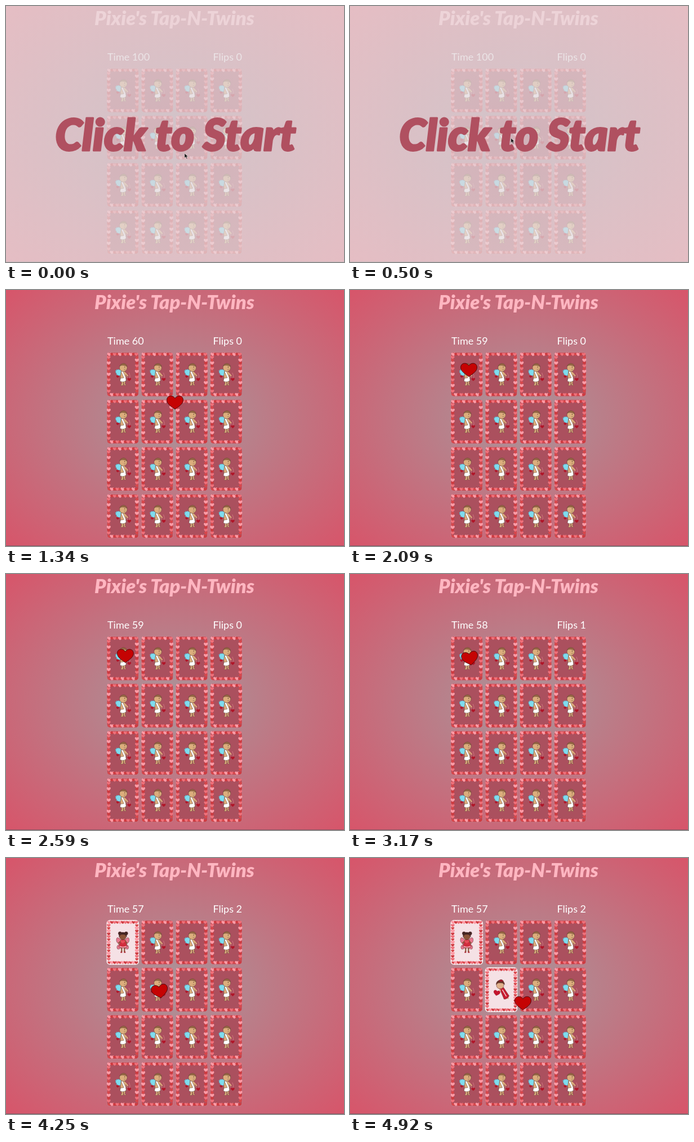
Write an HTML page that moves like this. It is 600 px wide and 455 px high and loops after 5000 ms.

```html
<!DOCTYPE html>
<html lang="en">
<head>
<meta charset="utf-8">
<title>Pixie's Tap-N-Twins</title>
<style>
html, body { margin: 0; width: 100%; height: 100%; overflow: hidden; background: #d5586a; }
svg { display: block; width: 600px; height: 455px; }
text { font-family: Lato, "Open Sans", sans-serif; }
.script { font-weight: 900; font-style: italic; text-anchor: middle; stroke-linejoin: round; }
.score { font-size: 18px; fill: #fff; }
</style>
</head>
<body>
<svg viewBox="0 0 600 455" xmlns="http://www.w3.org/2000/svg">
  <defs>
    <radialGradient id="bg" r=".7071">
      <stop offset="0" stop-color="#a9959a"/><stop offset="1" stop-color="#d7556a"/>
    </radialGradient>
    <radialGradient id="veil" r=".7071">
      <stop offset="0" stop-color="#dfd4d9"/><stop offset="1" stop-color="#eae2e3"/>
    </radialGradient>
    <path id="heart" d="M0 12C-5 8-15 3-14.500-5C-14-13-4-14 0-7.500C4-14 14-13 14.500-5C15 3 5 8 0 12Z"/>
    <g id="rim"></g>

    <g id="cherub" stroke="#5d4038" stroke-width=".5" stroke-linejoin="round">
      <path fill="#7fdcee" stroke="#4aa5bd" d="M0-3Q-3-9-6-8Q-7-10-9-8Q-12-10-11-7Q-15-7-12-5Q-14-3-11-2Q-12 1-9 1Q-8 3-5 2L0 2Z"/>
      <path fill="#dcae7c" d="M-3 11L-2 17L-4 19Q-1 21 1 19L1 13L2 18Q4 21 6 19L4 17L5 11Z"/>
      <path fill="#dcae7c" d="M-3-6Q3-8 5-3L6 6L5 12L-4 12Q-5 3-3-6Z"/>
      <path fill="#fff" d="M-3-5L0-6L5 5L6 11Q1 15-5 12L-4 7L2 6Z"/>
      <path fill="none" stroke="#dcae7c" stroke-width="2" d="M4-3L9 3"/>
      <path fill="none" stroke="#d77a88" stroke-width=".8" d="M11-3Q14 2 12 9M6 3L11 9"/>
      <circle cx="1" cy="-12" r="6.8" fill="#dcae7c"/>
      <path fill="#9a6842" d="M-5.500-15Q-4-19 1-19.500Q7-19 7.500-14Q1-18-5.500-15Z"/>
      <path fill="none" d="M2-9Q4-8 5-10"/>
      <g fill="#b01528" stroke="none">
        <use href="#heart" transform="translate(11.500 9) scale(.23)"/>
        <use href="#heart" transform="translate(-9 4) scale(.17)"/>
        <circle cx="3.500" cy="-13" r=".7" fill="#3b251c"/>
      </g>
    </g>

    <g id="fairy" stroke="#50262a" stroke-width=".5" stroke-linejoin="round">
      <path fill="#e9788f" d="M0 0Q-9-12-11-7Q-13 0-6 3Q-13 7-9 12Q-4 13 0 4Q4 13 9 12Q13 7 6 3Q13 0 11-7Q9-12 0 0Z"/>
      <path fill="none" stroke="#8b5438" stroke-width="2.200" d="M-2 8V17M3 8V17"/>
      <path fill="none" stroke="#a81c2c" stroke-width="2.200" d="M-4 17.500H-1M2 17.500H5"/>
      <path fill="#d02d3d" d="M-3-5L4-5L8 8Q0 12-7 8Z"/>
      <path fill="none" stroke="#f5b0bb" stroke-width="1.600" d="M-6 7Q0 10 7 7"/>
      <path fill="none" stroke="#8b5438" stroke-width="2" d="M-3-3L-8 2M4-3L8 2"/>
      <circle cx="-5" cy="-16" r="3" fill="#432522"/>
      <circle cx="6" cy="-16" r="3" fill="#432522"/>
      <circle cy="-11" r="6.200" fill="#8b5438"/>
      <path fill="#432522" d="M-6.500-10Q-7-18 0-18Q7-18 7-10Q4-15 0-14Q-4-15-6.500-10Z"/>
      <use href="#heart" transform="translate(0 -1) scale(.28)" fill="#e44c58" stroke="none"/>
    </g>

    <g id="girl" stroke="#59282a" stroke-width=".5" stroke-linejoin="round">
      <path fill="none" stroke="#e0b08a" stroke-width="2.400" d="M8 12L13 16"/>
      <path fill="#c81c30" d="M-3-2L4-4L14 11Q11 17 5 17Z"/>
      <path fill="none" stroke="#f7e4e6" stroke-width="1.400" d="M2 0L9 12"/>
      <path fill="none" stroke="#e0b08a" stroke-width="2" d="M-1 0L-6 5"/>
      <circle cx="-2" cy="-8" r="6.600" fill="#e0b08a"/>
      <path fill="#653326" d="M-9-9Q-9-16-2-17Q5-17 6-9Q2-13-2-12Q-6-13-9-9Z"/>
      <path fill="#a51c2c" d="M-5-15Q0-21 4-15Q0-13-5-15Z"/>
      <use href="#heart" transform="translate(-8 6) rotate(12) scale(.4)" fill="#c4142c"/>
    </g>
  </defs>

  <rect width="600" height="455" fill="url(#bg)"/>
  <rect y="454" width="600" height="1" fill="#8d5362"/>
  <text class="script" x="299" y="34" font-size="34.500" fill="#ffb6c1">Pixie's Tap-N-Twins</text>
  <text class="score" id="time" x="180" y="97"></text>
  <text class="score" id="flips" x="419" y="97" text-anchor="end"></text>
  <g id="cards"></g>
  <g id="start">
    <rect width="600" height="455" fill="url(#veil)" opacity=".74"/>
    <text class="script" x="301" y="257" font-size="77" fill="#b05060" stroke="#b05060" stroke-width="3">Click to Start</text>
  </g>
  <path id="arrow" d="M0 0V8L2 6.300L3.500 9.500L4.800 8.900L3.400 5.800H6Z" fill="#111" stroke="#ddd" stroke-width=".5"/>
  <use id="cursor" href="#heart" fill="#c50303" stroke="#3a0508" stroke-width=".8"/>
</svg>
<script>
const LOOP = 5000, STEP = 250 / 3;
const START = 583, CLICKS = [3166, 4249], TURN = 500;
const $ = id => document.getElementById(id);

// [ms, x, y]
const arrowPath = [[250, 317, 262], [583, 280, 230]];
const heartPath = [
  [583, 294, 243], [1333, 300, 200], [2083, 211, 142], [3167, 213, 150],
  [3417, 214, 151], [4083, 272, 236], [4250, 273, 237], [4417, 274, 238], [4917, 307, 258]
];

function buildRim() {
  const kinds = [["#ff9ba6", .25], ["#cf3b40", .21], ["#f0707a", .23], ["#d9474b", .2]];
  let out = "", n = 0;
  const add = (x, y) => {
    const [color, size] = kinds[n++ % 4];
    out += `<use href="#heart" fill="${color}" transform="translate(${x} ${y}) scale(${size})"/>`;
  };
  for (const y of [-35.5, 36]) for (let i = 0; i < 11; i++) add(-24 + i * 4.8, y);
  for (const x of [-25, 25]) for (let i = 1; i < 14; i++) add(x, -35 + i * 5);
  $("rim").innerHTML = out;
}

const back = `<g class="back">
  <rect x="-28" y="-39" width="56" height="78" rx="5" fill="#ab505e" stroke="#c88793" stroke-width=".8"/>
  <rect x="-26" y="-37" width="52" height="74" rx="3" fill="none" stroke="#cf474f" stroke-width="3.500" opacity=".55"/>
  <use href="#rim"/><use href="#cherub"/></g>`;

const front = figure => `<g class="front">
  <rect x="-28" y="-39" width="56" height="78" rx="5" fill="#f5e1e5" stroke="#fbeef0" stroke-width="1.600"/>
  <use href="#rim"/><use href="#${figure}"/></g>`;

function buildCards() {
  const figures = { 0: "fairy", 5: "girl" };
  let out = "";
  for (let i = 0; i < 16; i++) {
    const x = 207.3 + (i % 4) * 61.2, y = 150 + Math.floor(i / 4) * 84;
    out += `<g transform="translate(${x} ${y})">${back}${figures[i] ? front(figures[i]) : ""}</g>`;
  }
  $("cards").innerHTML = out;
}

const clamp = v => Math.max(0, Math.min(1, v));
const ease = v => v * v * (3 - 2 * v);

function along(path, t) {
  let i = 0;
  while (i < path.length - 2 && t >= path[i + 1][0]) i++;
  const [a, b] = [path[i], path[i + 1]];
  const k = ease(clamp((t - a[0]) / (b[0] - a[0])));
  return [a[1] + (b[1] - a[1]) * k, a[2] + (b[2] - a[2]) * k];
}

function turn(card, t, from) {
  const c = Math.cos(Math.PI * ease(clamp((t - from) / TURN)));
  const scale = `scale(${Math.max(.001, Math.abs(c))} 1)`;
  for (const [name, on] of [["back", c > 0], ["front", c <= 0]]) {
    const face = card.querySelector("." + name);
    face.setAttribute("transform", scale);
    face.style.display = on ? "" : "none";
  }
}

function draw(ms) {
  const t = Math.floor(ms / STEP) * STEP;
  const playing = t >= START;
  const left = 60 - Math.max(0, Math.floor((t - 1083) / 1000));
  $("time").textContent = "Time " + (playing ? left : 100);
  $("flips").textContent = "Flips " + CLICKS.filter(c => t >= c).length;
  $("start").style.display = playing ? "none" : "";
  $("arrow").style.display = playing ? "none" : "";
  $("cursor").style.display = playing ? "" : "none";

  const [ax, ay] = along(arrowPath, t);
  $("arrow").setAttribute("transform", `translate(${ax} ${ay})`);
  const [x, y] = along(heartPath, t);
  const pressed = CLICKS.some(c => Math.abs(t - c) < 90);
  $("cursor").setAttribute("transform", `translate(${x} ${y}) rotate(${pressed ? -10 : 0})`);

  turn(turning[0], t, CLICKS[0]);
  turn(turning[1], t, CLICKS[1]);
}

buildRim();
buildCards();
const turning = [0, 5].map(i => $("cards").children[i]);
const began = performance.now();
function tick() {
  draw((performance.now() - began) % LOOP);
  requestAnimationFrame(tick);
}
tick();
</script>
</body>
</html>
```
